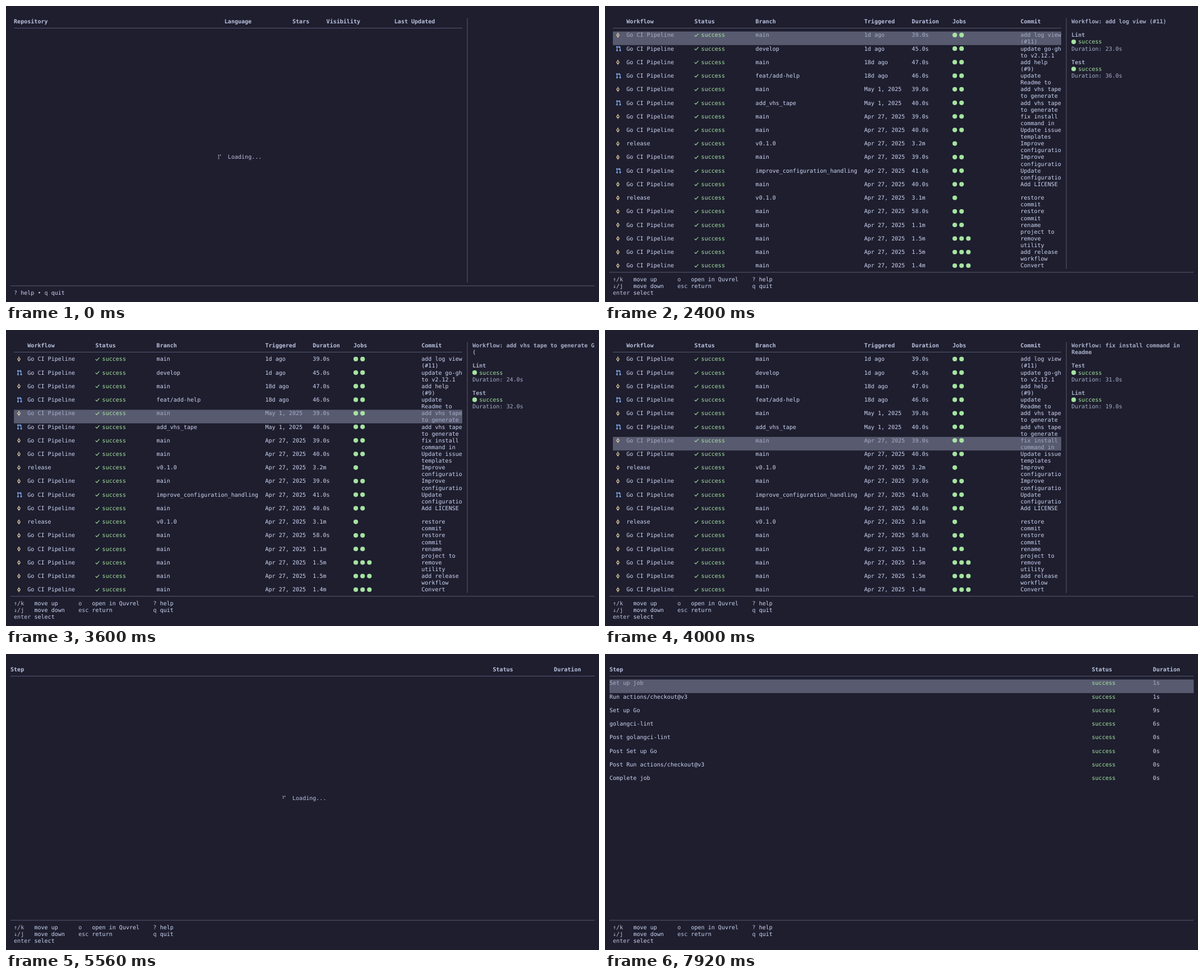
An HTML page with a canvas for the animation above (8000 ms loop, 1058 px wide and 529 px high).

```html
<!DOCTYPE html>
<html lang="en">
<head>
<meta charset="utf-8">
<title>CI dashboard</title>
<style>
html, body { margin: 0; width: 100%; height: 100%; overflow: hidden; background: #1e1e2e; }
canvas { display: block; width: 1058px; height: 529px; }
</style>
</head>
<body>
<canvas id="stage"></canvas>
<script>
const W = 1058, H = 529, LOOP = 8000;
const CELL = 6.06, LINE = 12.12, LEFT = 8, TOP = 9.25;
const C = {
  bg: '#1e1e2e', text: '#cdd6f4', head: '#bac2de', dim: '#a6adc8', rule: '#585b70',
  green: '#a6e3a1', blue: '#89b4fa', cream: '#f9e2af'
};
const canvas = document.getElementById('stage');
const dpr = window.devicePixelRatio || 1;
canvas.width = W * dpr;
canvas.height = H * dpr;
const ctx = canvas.getContext('2d');
ctx.scale(dpr, dpr);

const SIDE = 136, TABLE = [1, 133];

const WORKFLOW_COLS = [[5, 'Workflow'], [25, 'Status'], [43, 'Branch'], [75, 'Triggered'],
  [89, 'Duration'], [101, 'Jobs'], [121, 'Commit']];
// branch ; triggered ; duration ; job count ; commit lines
const RUNS = `main;1d ago;39.0s;2;add log view/(#11)
develop;1d ago;45.0s;2;update go-gh/to v2.12.1
main;18d ago;47.0s;2;add help/(#9)
feat/add-help;18d ago;46.0s;2;update/Readme to
main;May 1, 2025;39.0s;2;add vhs tape/to generate
add_vhs_tape;May 1, 2025;40.0s;2;add vhs tape/to generate
main;Apr 27, 2025;39.0s;2;fix install/command in
main;Apr 27, 2025;40.0s;2;Update issue/templates
v0.1.0;Apr 27, 2025;3.2m;1;Improve/configuratio
main;Apr 27, 2025;39.0s;2;Improve/configuratio
improve_configuration_handling;Apr 27, 2025;41.0s;2;Update/configuratio
main;Apr 27, 2025;40.0s;2;Add LICENSE
v0.1.0;Apr 27, 2025;3.1m;1;restore/commit
main;Apr 27, 2025;58.0s;2;restore/commit
main;Apr 27, 2025;1.1m;2;rename/project to
main;Apr 27, 2025;1.5m;3;remove/utility
main;Apr 27, 2025;1.5m;3;add release/workflow
main;Apr 27, 2025;1.4m;3;Convert`.split('\n').map(row => {
  const [branch, when, took, jobs, commit] = row.split(';');
  return { branch, when, took, jobs: +jobs, commit: commit.split('/') };
});
const PULL_REQUESTS = [1, 3, 5, 10];

const RUN_DETAILS = [
  [['add log view (#11)'], ['Lint', 23], ['Test', 36]],
  [['add log view'], ['Lint', 40], ['Test', 36]],
  [['add help (#9)'], ['Lint', 42], ['Test', 34]],
  [['add help'], ['Lint', 41], ['Test', 31]],
  [['add vhs tape to generate G', '('], ['Lint', 24], ['Test', 32]],
  [['add vhs tape to generate G'], ['Lint', 23], ['Test', 33]],
  [['fix install command in', 'Readme'], ['Test', 31], ['Lint', 19]]
];

const steps = (...middle) => ['Set up job', 'Run actions/checkout@v3', 'Set up Go', ...middle,
  'Post Set up Go', 'Post Run actions/checkout@v3', 'Complete job'];
const JOBS = [
  { name: 'Test', took: '31.0s', steps: steps('Install dependencies', 'Run tests') },
  { name: 'Lint', took: '19.0s', steps: steps('golangci-lint', 'Post golangci-lint') }
];
const STEP_TIMES = [1, 1, 9, 6, 0, 0, 0, 0];

const px = col => LEFT + col * CELL;
const py = line => TOP + line * LINE;

function text(col, line, str, color = C.text, bold = false) {
  ctx.font = `${bold ? 'bold ' : ''}10.066px "DejaVu Sans Mono", monospace`;
  ctx.fillStyle = color;
  ctx.fillText(str, px(col), py(line) + 9.7);
}

function rule(from, to, line) {
  ctx.fillStyle = C.rule;
  ctx.fillRect(px(from), py(line + 0.5) - 0.5, px(to) - px(from), 1);
}

function highlight(from, to, line) {
  ctx.fillStyle = C.rule;
  ctx.fillRect(px(from), py(line), px(to) - px(from), 2 * LINE);
}

function disc(x, y, r, color) {
  ctx.fillStyle = color;
  ctx.beginPath();
  ctx.arc(x, y, r, 0, 2 * Math.PI);
  ctx.fill();
}

const dot = (col, line) => disc(px(col) + 4, py(line) + 6.3, 4.1, C.green);

function icon(col, line, color, draw) {
  ctx.save();
  ctx.translate(px(col), py(line));
  ctx.strokeStyle = color;
  ctx.lineWidth = 1.1;
  ctx.beginPath();
  draw();
  ctx.stroke();
  ctx.restore();
}

function path(...points) {
  points.forEach(([x, y], i) => i ? ctx.lineTo(x, y) : ctx.moveTo(x, y));
}

function ring(x, y, r) {
  ctx.moveTo(x + r, y);
  ctx.arc(x, y, r, 0, 2 * Math.PI);
}

const check = (col, line) => icon(col, line, C.green, () => path([0.3, 6.6], [2.5, 8.9], [7, 3.8]));

const commitIcon = (col, line) => icon(col, line, C.cream, () => {
  ring(2.9, 6.4, 2);
  path([2.9, 2], [2.9, 4.4]);
  path([2.9, 8.4], [2.9, 10.8]);
});

const pullIcon = (col, line) => icon(col, line, C.blue, () => {
  ring(1.4, 3.3, 1);
  ring(1.4, 9.5, 1);
  ring(6.9, 9.5, 1);
  path([1.4, 4.3], [1.4, 8.5]);
  path([6.9, 8.5], [6.9, 3.4], [4.2, 3.4]);
  path([5.6, 1.8], [4, 3.4], [5.6, 5]);
});

function spinner(col, line, index) {
  const glyphs = '⠋⠙⠹⠸⠼⠴⠦⠧⠇⠏';
  const bits = glyphs.charCodeAt(index % glyphs.length) - 0x2800;
  for (let i = 0; i < 6; i++) {
    if (bits >> i & 1) {
      disc(px(col) + 1.8 + 3 * Math.floor(i / 3), py(line) + 2.8 + 3 * (i % 3), 0.9, C.text);
    }
  }
  text(col + 3, line, 'Loading...', C.head);
}

function header(cols, [from, to] = TABLE) {
  cols.forEach(([col, label]) => text(col, 1, label, C.head, true));
  rule(from, to, 2);
}

function help(full) {
  const keys = full
    ? [[1, 39, '↑/k', 7, 'move up'], [1, 40, '↓/j', 7, 'move down'], [1, 41, 'enter', 7, 'select'],
       [20, 39, 'o', 24, 'open in Quvrel'], [20, 40, 'esc', 24, 'return'],
       [42, 39, '?', 44, 'help'], [42, 40, 'q', 44, 'quit']]
    : [[1, 41, '?', 3, 'help'], [8, 41, '•', 10, ''], [10, 41, 'q', 12, 'quit']];
  rule(0, 172, full ? 38 : 40);
  keys.forEach(([col, line, key, at, label]) => {
    text(col, line, key, C.head);
    text(at, line, label);
  });
}

function divider(full) {
  ctx.fillStyle = C.rule;
  ctx.fillRect(px(134.5) - 0.5, py(1), 1, (full ? 37 : 39) * LINE);
}

function repositories(loading) {
  header([[1, 'Repository'], [63, 'Language'], [83, 'Stars'], [93, 'Visibility'], [113, 'Last Updated']]);
  if (loading) return spinner(61, 21, 9);
  highlight(...TABLE, 3);
  [[1, 'gh-ci'], [63, 'Go'], [83, '4'], [93, 'Public'], [113, 'Jun 5, 2025']]
    .forEach(([col, value]) => text(col, 3, value, C.dim));

  text(SIDE, 1, 'Repository: gh-ci', C.dim, true);
  const recent = [['Go CI Pipeline', '1d ago', 'add log view (#11)'],
    ['release', 'Apr 27, 2025', 'Improve configuration']];
  recent.forEach(([name, when, commit], i) => {
    const line = 3 + 4 * i;
    text(SIDE, line, name, C.head, true);
    check(SIDE, line + 1);
    text(SIDE + 2, line + 1, 'success ·', C.green);
    text(SIDE + 12, line + 1, when, C.dim);
    commitIcon(SIDE, line + 2);
    text(SIDE + 2, line + 2, 'push · ' + commit);
  });
  text(SIDE, 10, 'handling');
}

function workflows(selected) {
  header(WORKFLOW_COLS);
  RUNS.forEach((run, i) => {
    const line = 3 + 2 * i, color = i === selected ? C.dim : C.text;
    if (i === selected) highlight(...TABLE, line);
    (PULL_REQUESTS.includes(i) ? pullIcon : commitIcon)(2, line);
    text(5, line, run.branch === 'v0.1.0' ? 'release' : 'Go CI Pipeline', color);
    check(25, line);
    text(27, line, 'success', C.green);
    text(43, line, run.branch, color);
    text(75, line, run.when, color);
    text(89, line, run.took, color);
    for (let j = 0; j < run.jobs; j++) dot(101 + 2 * j, line);
    run.commit.forEach((part, j) => text(121, line + j, part, color));
  });

  const [title, ...jobs] = RUN_DETAILS[selected];
  title.forEach((part, i) => text(SIDE, 1 + i, (i ? '' : 'Workflow: ') + part, C.dim, true));
  jobs.forEach(([name, seconds], i) => {
    const line = 2 + title.length + 4 * i;
    text(SIDE, line, name, C.dim, true);
    dot(SIDE, line + 1);
    text(SIDE + 2, line + 1, 'success', C.green);
    text(SIDE, line + 2, `Duration: ${seconds}.0s`, C.dim);
  });
}

function jobList(selected) {
  header([[1, 'Job'], [103, 'Status'], [121, 'Duration']]);
  JOBS.forEach((job, i) => {
    const line = 3 + 2 * i, color = i === selected ? C.dim : C.text;
    if (i === selected) highlight(...TABLE, line);
    text(1, line, job.name, color);
    dot(103, line);
    text(106, line, 'success', C.green);
    text(121, line, job.took, color);
  });

  const job = JOBS[selected];
  text(SIDE, 1, 'Run: ' + job.name, C.dim, true);
  job.steps.forEach((step, i) => {
    const line = 3 + 3 * i;
    text(SIDE, line, step, C.dim, true);
    text(SIDE, line + 1, 'Status:', C.dim);
    dot(SIDE + 8, line + 1);
    text(SIDE + 10, line + 1, '· success', C.head);
  });
}

function stepList(t) {
  header([[0, 'Step'], [142, 'Status'], [160, 'Duration']], [0, 172]);
  if (t < 6480) return spinner(80, 20, Math.floor(Math.floor((t - 5560) / 40) * 0.79));
  JOBS[1].steps.forEach((step, i) => {
    const line = 3 + 2 * i, selected = i === 0 && t >= 7920;
    const color = selected ? C.dim : C.text;
    if (selected) highlight(0, 172, line);
    text(0, line, step, color);
    text(142, line, 'success', C.green);
    text(160, line, STEP_TIMES[i] + 's', color);
  });
}

function draw(t) {
  ctx.fillStyle = C.bg;
  ctx.fillRect(0, 0, W, H);
  ctx.textRendering = 'geometricPrecision';
  const full = t >= 800;
  help(full);
  if (t < 5560) divider(full);
  if (t < 2400) repositories(t < 80);
  else if (t < 4880) workflows([3000, 3160, 3360, 3600, 3800, 4000].filter(move => t >= move).length);
  else if (t < 5560) jobList(t < 5080 ? 0 : 1);
  else stepList(t);
}

const start = performance.now();
function tick() {
  draw((performance.now() - start) % LOOP);
  requestAnimationFrame(tick);
}
tick();
</script>
</body>
</html>
```
